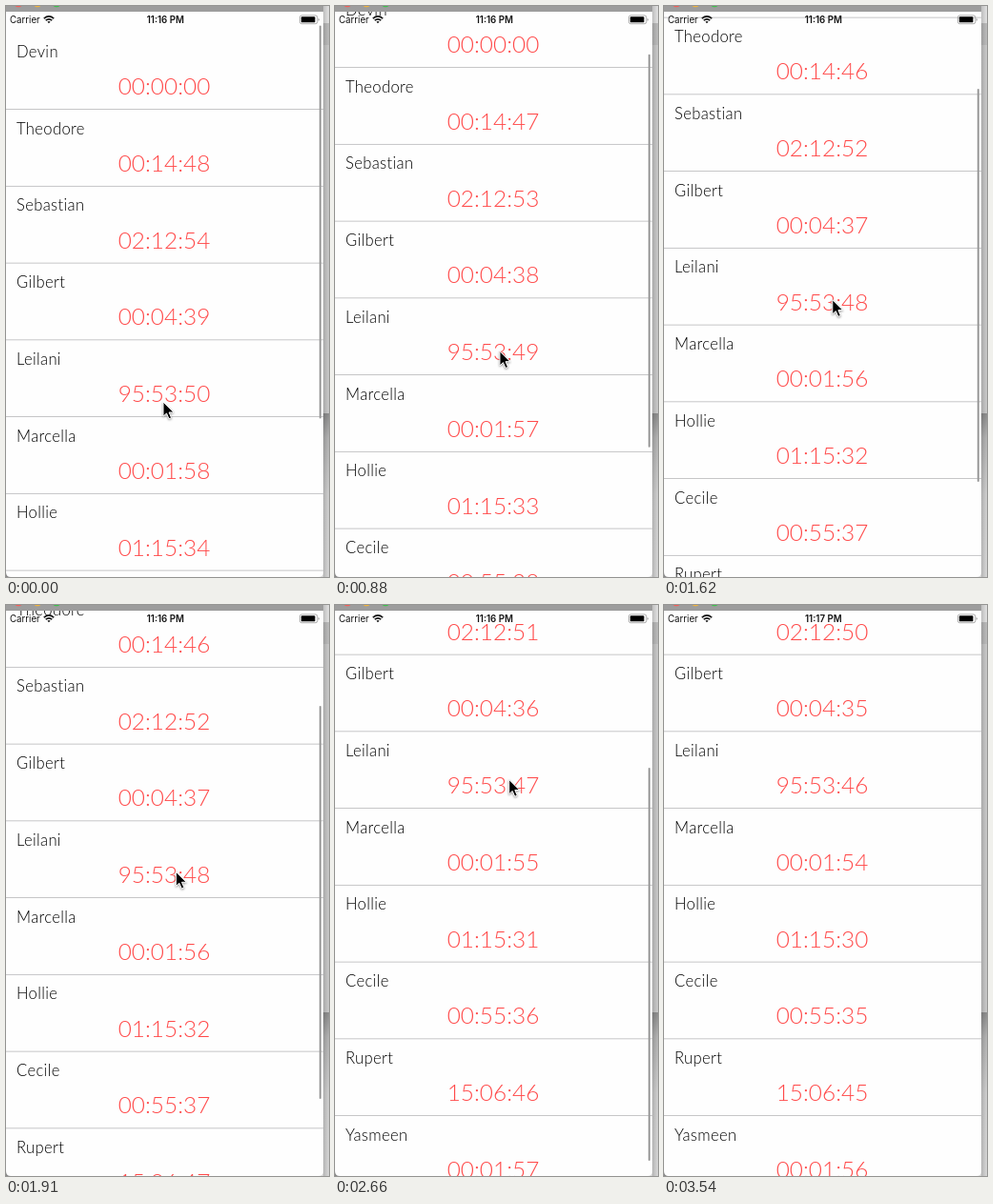
Write an HTML page that moves like this. It is 339 px wide and 600 px high and loops after 3.69 s.

```html
<!DOCTYPE html>
<html lang="en">
<head>
<meta charset="utf-8">
<title>Timer list</title>
<style>
  html, body { margin: 0; width: 100%; height: 100%; overflow: hidden; background: #fff; }
  svg { display: block; width: 339px; height: 600px; }
  .name { font: 300 16.6px Lato, "Open Sans", sans-serif; letter-spacing: .35px; fill: #000; }
  .clock { font: 300 24.4px Lato, "Open Sans", sans-serif; fill: #ff4a4a; text-anchor: middle; }
  .status { font: 400 9.7px Inter, Roboto, sans-serif; fill: #111; }
  .time { font-weight: 600; text-anchor: middle; }
</style>
</head>
<body>
<svg viewBox="0 0 339 600">
  <defs>
    <linearGradient id="under" x2="0" y2="1">
      <stop offset="0" stop-color="#8e8e8e"/>
      <stop offset=".15" stop-color="#b4b4b4"/>
      <stop offset=".5" stop-color="#d0d0d0"/>
      <stop offset="1" stop-color="#d8d8d8"/>
    </linearGradient>
    <linearGradient id="edge">
      <stop offset="0" stop-color="#000" stop-opacity=".16"/>
      <stop offset="1" stop-color="#000" stop-opacity="0"/>
    </linearGradient>
    <clipPath id="screen"><path d="M0 6H333V595q0 5-5 5H5q-5 0-5-5z"/></clipPath>
  </defs>

  <!-- desktop behind the window -->
  <rect width="339" height="600" fill="#8a8a8a"/>
  <rect x="328" width="11" height="18" fill="#e2e2e2"/>
  <rect x="328" y="18" width="11" height="23" fill="#bcbcbc"/>
  <rect x="328" y="41" width="11" height="387" fill="#cacaca"/>
  <rect x="328" y="428" width="11" height="172" fill="url(#under)"/>
  <rect x="333" width="6" height="600" fill="url(#edge)"/>

  <!-- title bar -->
  <rect width="333" height="6" fill="#9d9d9d"/>
  <circle cx="13" cy="-4" r="5.3" fill="#f4605a"/>
  <circle cx="33" cy="-4" r="5.3" fill="#f0b23c"/>
  <circle cx="53" cy="-4" r="5.3" fill="#3fc14c"/>

  <g clip-path="url(#screen)">
    <rect width="333" height="600" fill="#fefefe"/>
    <g id="list"></g>
    <rect id="bar" x="328.8" width="2" height="413" rx="1" fill="#9a9a9a"/>
    <text class="status" x="4" y="18">Carrier</text>
    <g fill="none" stroke="#111" stroke-width="1.7">
      <path d="M39.8 13.1q5.2-4.4 10.4 0M41.7 15.2q3.3-2.7 6.6 0"/>
      <path d="M43.4 16.6q1.6-1.3 3.2 0L45 18.3z" fill="#111" stroke="none"/>
    </g>
    <text class="status time" id="time" x="167.3" y="18"></text>
    <rect x="308.4" y="9.9" width="18.4" height="8.8" rx="2" fill="none" stroke="#999" stroke-width=".8"/>
    <rect x="309.8" y="11.3" width="14.6" height="6" rx=".9"/>
    <path d="M327.7 13v2.8q1.2-.4 1.2-1.4t-1.2-1.4z" fill="#999"/>
  </g>

  <path id="cursor" d="M0 0V15.2L3.5 12 6 17.8 8.6 16.7 6.1 11H11z" stroke="#fff" stroke-width="1"
        style="filter:drop-shadow(0 1px 1px #0006)"/>
</svg>
<script>
const LOOP = 3690, STEP = LOOP / 25, ROW = 80.75;
const DRAG = 3, RELEASE = 18, GONE = 24;  // steps at which the pointer acts
const $ = id => document.getElementById(id);

const people = {
  Devin: "00:00:00", Theodore: "00:14:48", Sebastian: "02:12:54", Gilbert: "00:04:39",
  Leilani: "95:53:50", Marcella: "00:01:58", Hollie: "01:15:34", Cecile: "00:55:39",
  Rupert: "15:06:49", Yasmeen: "00:02:00"
};

// scroll offset at every third step of the drag
const drag = [2, 44, 77, 106.25, 159.5, 218];

const clamp = v => Math.min(1, Math.max(0, v));
const smooth = v => v * v * (3 - 2 * v);
const two = n => String(Math.floor(n)).padStart(2, "0");
const hms = s => [s / 3600, s / 60 % 60, s % 60].map(two).join(":");
const seconds = text => text.split(":").reduce((sum, n) => sum * 60 + +n, 0);

function scrollAt(step) {
  if (step < DRAG) return 0;
  const p = Math.min((step - DRAG) / 3, drag.length - 1), i = Math.floor(p);
  return drag[i] + ((drag[i + 1] ?? drag[i]) - drag[i]) * (p - i);
}

function cursorAt(step, scroll) {
  const leave = clamp((step - RELEASE) / 5);
  const slack = 8 * clamp((step - 1) / 2);  // travel before the list follows
  return [
    165 + 1.2 * Math.sqrt(scroll) + 119 * smooth(clamp((step - RELEASE - 1) / 4)),
    416 - slack - 1.03 * scroll + 407 * (1 - (1 - leave) ** 1.8)
  ];
}

$("list").innerHTML = Object.keys(people).map((name, i) => `
  <g transform="translate(0 ${27.8 + i * ROW})">
    <text class="name" x="11" y="26.2">${name}</text>
    <text class="clock" x="166" y="65.4"></text>
    <rect y="80.4" width="333" height=".8" fill="#b8b8ba"/>
  </g>`).join("");
const clocks = document.querySelectorAll(".clock");
const limits = Object.values(people).map(seconds);

function draw(now) {
  let step = Math.floor((now % LOOP + 12) / STEP);
  if (step < 2) step = 0;
  const scroll = scrollAt(step);
  const passed = Math.floor((step * STEP + 790) / 1000);

  $("list").setAttribute("transform", `translate(0 ${-scroll})`);
  clocks.forEach((c, i) => c.textContent = hms(Math.max(0, limits[i] - passed)));
  $("bar").setAttribute("y", 20.5 + scroll * .69);
  $("bar").style.display = step > RELEASE ? "none" : "";
  $("time").textContent = step > RELEASE ? "11:17 PM" : "11:16 PM";
  $("cursor").setAttribute("transform", `translate(${cursorAt(step, scroll)})`);
  $("cursor").style.display = step < GONE ? "" : "none";
}

const start = performance.now();
function loop() {
  draw(performance.now() - start);
  requestAnimationFrame(loop);
}
loop();
</script>
</body>
</html>
```
